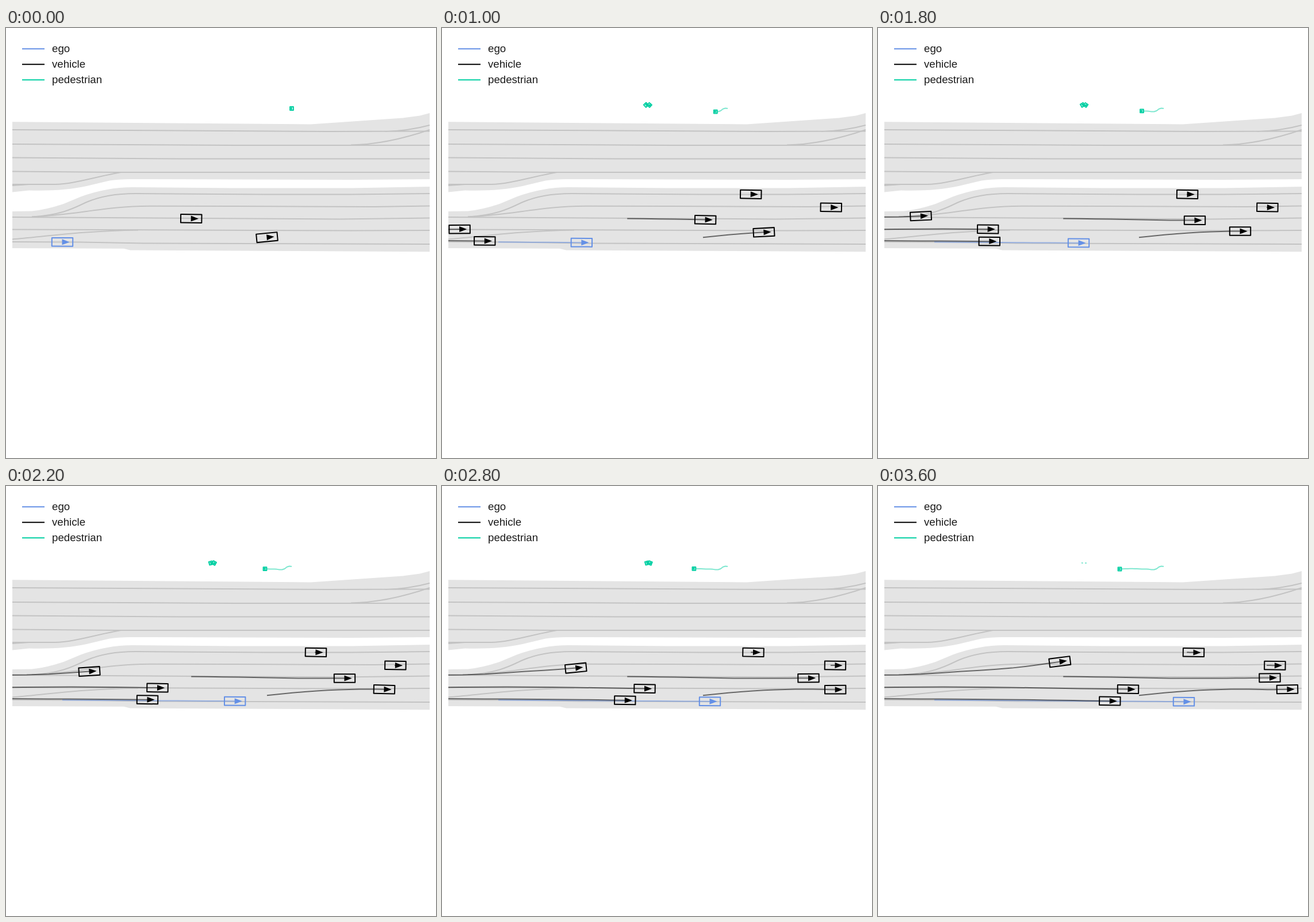
An HTML page that plays this animation: 748x748 px, repeating every 3.8 s.

```html
<!DOCTYPE html>
<html lang="en">
<head>
<meta charset="utf-8">
<title>Traffic scene</title>
<style>
  html, body { margin: 0; width: 100%; height: 100%; overflow: hidden; background: #fff; }
  svg { display: block; width: 100%; height: 100%; }
  text { font: 18.67px "Liberation Sans", Arial, sans-serif; fill: #1a1a1a; }
  .road { fill: #e4e4e4; }
  .lanes { fill: none; stroke: #c3c3c3; stroke-width: 2; }
</style>
</head>
<body>
<svg viewBox="0 0 748 748">
  <clipPath id="area"><rect x="11" y="11" width="726" height="726"/></clipPath>
  <g class="road">
    <path d="M11 163.3L530 167.5L690 156.5L720 152.5L737 148V263L600 264L215 263Q195 263 180 265.5L140 275Q100 284 40 282.5L11 285.5Z"/>
    <path d="M11 319L45 318.5Q70 316 100 306L130 293.5Q175 277 220 277L400 278.5H600L737 276V389.3L216 386.5L205 383.8L11 383Z"/>
  </g>
  <g class="lanes">
    <path d="M11 177L560 180L737 179.5M660 180Q700 179 737 169"/>
    <path d="M11 202L400 204H737M600 203.5C640 203 690 193 737 177"/>
    <path d="M11 225.5L300 227.5H737"/>
    <path d="M11 249.5L190 251H737"/>
    <path d="M11 272H85C120 271 150 260 200 251M11 274L40 272"/>
    <path d="M45 328.5C100 325 120 312 140 303Q175 288 225 288L450 289.5H600L737 288"/>
    <path d="M45 328.5C120 326 170 310 250 309.7L400 310L640 311L737 309.5"/>
    <path d="M11 329L580 332.5L737 330.5"/>
    <path d="M11 350.5L600 352.5L737 352"/>
    <path d="M11 367.5C60 364 130 353 230 351.5"/>
    <path d="M11 372L130 372.5L240 374.5L737 376"/>
  </g>
  <g id="agents" clip-path="url(#area)"></g>
  <g id="legend"></g>
</svg>
<script>
const STEP = 200, LOOP = 3800, LEFT = 11;
const TIMES = [0, 600, 1400, 1800, 2200, 2800, 3600];
const BLUE = '#6490e6', BLACK = '#000', GREEN = '#00cfa2';

// xs holds the last positions along TIMES, extra adds more by time; path holds x, y pairs.
const ego = { color: BLUE, xs: [98, 185.7, 297.7, 349, 398.2, 466, 532], path: [98, 372.3, 298, 373.6, 532, 375.2] };

const vehicles = [
  { xs: [322.2, 404.5, 508, 551, 589, 637.5, 681.5],
    path: [322, 331.5, 404, 332.5, 508, 334.4, 589, 334.5, 681, 333.7] },
  { xs: [454, 519.6, 597, 630, 658, 684.2, 712], extra: { 3200: 695.3 },
    path: [454, 364.2, 519, 358, 597, 353.9, 640, 353.5, 684, 354.2, 712, 353.7] },
  { xs: [6.5, 138.5, 193.8, 246, 318.3, 403.3],
    path: [6, 370, 246, 371.7, 318, 372.8, 403, 374] },
  { xs: [-53.5, 113, 191.2, 263.5, 352.5, 435],
    path: [-54, 350.6, 191, 349.9, 263, 351, 352, 352.5, 435, 353.5] },
  { xs: [-3.5, 74.5, 145, 232.8, 316.3],
    path: [-4, 329, 36, 328.6, 74, 327.2, 145, 322.6, 233, 316.6, 316, 305.8] },
  { start: 200, xs: [676.8, 676.8, 677.4, 677.4, 677.4, 684, 690.4], extra: { 1600: 678.2, 2400: 680.4 },
    path: [676, 312, 691, 312.2] },
  { start: 1000, xs: [537, 537.6, 538.1, 539, 541.5, 549],
    path: [537, 289.3, 549, 289.5] }
].map(v => ({ ...v, color: BLACK }));

const pedestrians = [
  { xs: [497, 484.7, 467, 459, 450.5, 438.4, 420.5], turn: [180, 180],
    path: [420, 144.5, 438, 143.8, 467, 144.5, 484.7, 144, 490, 140, 497, 140] },
  { start: 200, end: 3000, xs: [353.7, 354.3, 355.4, 355.8, 356.3, 356.5, 356.6],
    turn: [-35, -35, -45, -30, -15, -15, -15], path: [353, 133.7, 357, 134] },
  { start: 200, end: 3000, xs: [361, 360.8, 361, 361.3, 362, 362, 362.3],
    turn: [35, 35, 45, 35, 30, 22, 22], path: [360, 134, 363, 134] }
].map(p => ({ ...p, color: GREEN, walking: true }));

function prepare({ xs, extra = {}, path, turn, start, end = LOOP, ...rest }) {
  const times = TIMES.slice(-xs.length);
  const motion = [...times.map((t, i) => [t, xs[i]]), ...Object.entries(extra).map(([t, x]) => [+t, x])];
  return {
    ...rest, end, start: start ?? times[0],
    motion: motion.sort((a, b) => a[0] - b[0]),
    path: path.flatMap((x, i) => i % 2 ? [] : [[x, path[i + 1]]]),
    turn: turn?.map((angle, i) => [TIMES[i], angle])
  };
}
const agents = [ego, ...vehicles, ...pedestrians].map(prepare);

const slope = (keys, i) => (keys[i + 1][1] - keys[i][1]) / (keys[i + 1][0] - keys[i][0]);

function tangent(keys, i) {
  const last = keys.length - 1;
  if (i === 0 || i === last) return slope(keys, Math.min(i, last - 1));
  const before = keys[i][0] - keys[i - 1][0], after = keys[i + 1][0] - keys[i][0];
  return (slope(keys, i - 1) * after + slope(keys, i) * before) / (before + after);
}

// Smooth curve through [position, value] keys.
function sample(keys, p) {
  let i = 0;
  while (i < keys.length - 2 && p >= keys[i + 1][0]) i++;
  const span = keys[i + 1][0] - keys[i][0], u = (p - keys[i][0]) / span, v = 1 - u;
  return v * v * (1 + 2 * u) * keys[i][1] + u * u * (3 - 2 * u) * keys[i + 1][1]
    + span * u * v * (v * tangent(keys, i) - u * tangent(keys, i + 1));
}

function pose({ motion, path, turn }, t) {
  const x = sample(motion, t), y = sample(path, x);
  const angle = turn ? sample(turn, t)
    : Math.atan(sample(path, x + .5) - sample(path, x - .5)) * 180 / Math.PI;
  return { x, y, angle };
}

function trail(agent, now) {
  const points = [];
  for (let t = agent.start; t <= Math.min(now, agent.end); t += STEP) {
    const { x, y } = pose(agent, t);
    points.push(`${x.toFixed(2)},${y.toFixed(2)}`);
  }
  return `<polyline points="${points.join(' ')}" fill="none" stroke="${agent.color}"
    stroke-width="2" stroke-linejoin="round" opacity="${agent.walking ? .5 : .55}"/>`;
}

function body(agent, now) {
  if (now < agent.start || now > agent.end) return '';
  const { x, y, angle } = pose(agent, now);
  const [w, h] = agent.walking ? [2.9, 2.9] : [18.2, 7.3];
  const arrow = agent.walking ? 'M-.8 -2.5L2.5 -1V1L-.8 2.5Z' : 'M-.5 -5L12.7 0L-.5 5Z';
  // Outlines appear only once they are entirely inside the plot.
  const box = x - w < LEFT ? '' : `<rect x="${-w}" y="${-h}" width="${2 * w}" height="${2 * h}"
    fill="none" stroke="${agent.color}" stroke-width="2" stroke-linejoin="round"/>`;
  return `<g transform="translate(${x} ${y}) rotate(${angle})">${box}<path d="${arrow}" fill="${agent.color}"/></g>`;
}

document.getElementById('legend').innerHTML =
  [['ego', BLUE], ['vehicle', BLACK], ['pedestrian', GREEN]].map(([label, color], i) => {
    const y = 36.3 + 27 * i;
    return `<path d="M28 ${y}H67" stroke="${color}" stroke-width="2"/><text x="80" y="${y + 6}">${label}</text>`;
  }).join('');

const layer = document.getElementById('agents');
let shown = -1;
function draw() {
  const now = Math.floor(performance.now() % LOOP / STEP) * STEP;
  if (now !== shown) {
    shown = now;
    layer.innerHTML = agents.map(a => trail(a, now)).join('') + agents.map(a => body(a, now)).join('');
  }
  requestAnimationFrame(draw);
}
draw();
</script>
</body>
</html>
```
